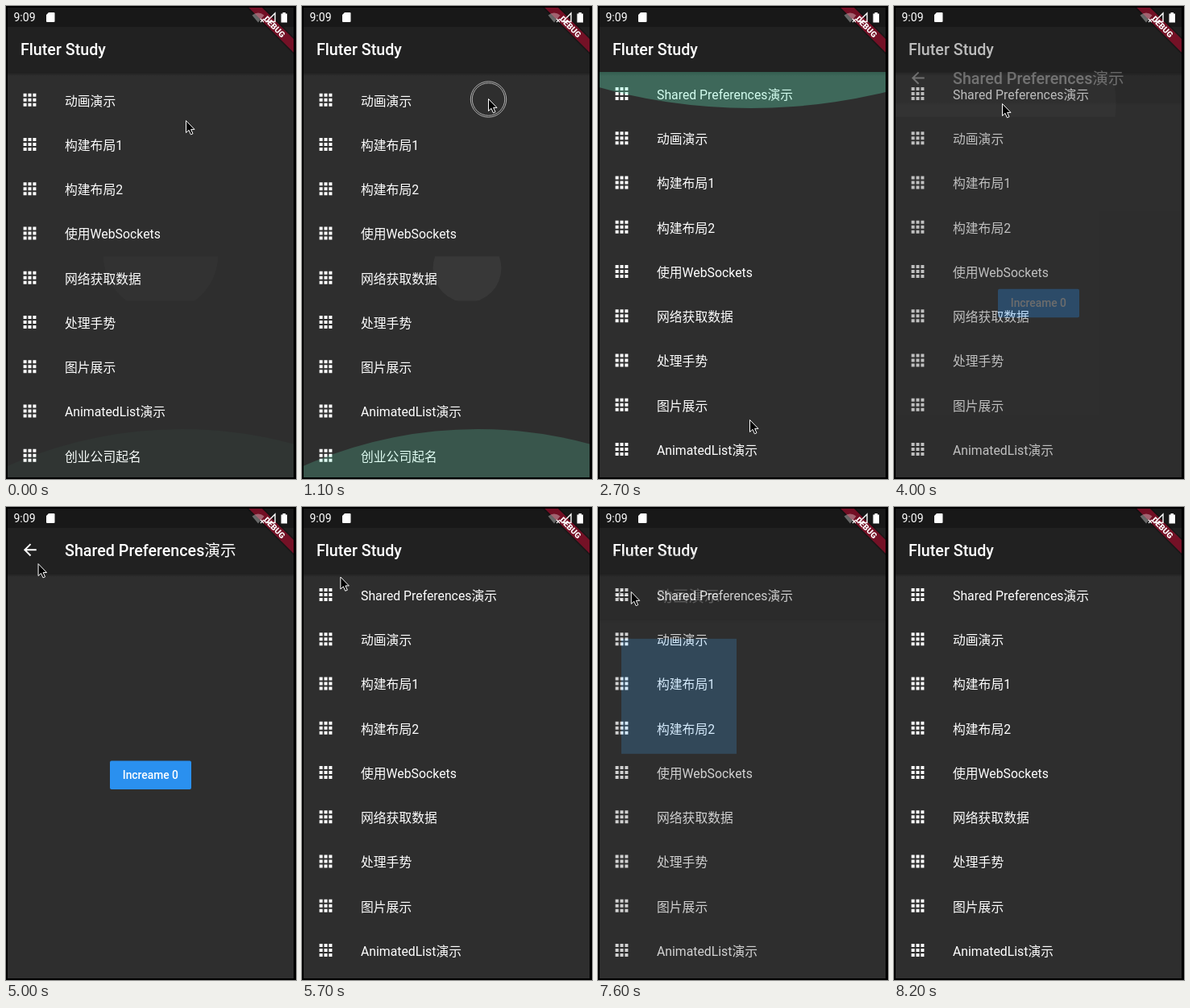
An HTML page that plays this animation: 360 by 588 pixels, repeating every 8300 ms.

```html
<!DOCTYPE html>
<html lang="zh-CN">
<head>
<meta charset="utf-8">
<title>Fluter Study</title>
<style>
  html, body { margin: 0; width: 100%; height: 100%; overflow: hidden; background: #000; }
  body > svg { display: block; width: 360px; height: 588px; }
  text { fill: #fff; font-family: Roboto, "Noto Sans CJK SC", "Noto Sans CJK", sans-serif; white-space: pre; }
  .item { font-size: 15.8px; }
  .title { font-size: 19.7px; font-weight: 500; }
  .title tspan { font-weight: 400; }
  .button { font-size: 13.8px; font-weight: 500; text-anchor: middle; }
  .debug { font-size: 10.2px; font-weight: 900; text-anchor: middle; }
</style>
</head>
<body>
<svg viewBox="0 0 360 588">
  <defs>
    <clipPath id="screen"><rect x="2" y="2" width="355" height="584"/></clipPath>
    <clipPath id="viewport"><rect x="2" y="82" width="355" height="504"/></clipPath>
    <linearGradient id="fade" x2="0" y2="1">
      <stop stop-opacity=".35"/><stop offset="1" stop-opacity="0"/>
    </linearGradient>
    <g id="chrome">
      <rect x="2" y="2" width="355" height="584" fill="#2e2e2e"/>
      <rect x="2" y="82" width="355" height="5" fill="url(#fade)"/>
      <rect x="2" y="2" width="355" height="80" fill="#212121"/>
    </g>
    <path id="apps" fill="#fff"/>
    <path id="back" fill="#fff" transform="translate(18 41.5) scale(.986)"
      d="M20 11H7.83l5.59-5.59L12 4l-8 8 8 8 1.41-1.41L7.83 13H20z"/>
  </defs>

  <g clip-path="url(#screen)">
    <use href="#chrome"/>
    <text class="title" x="18" y="61">Fluter Study</text>
    <g clip-path="url(#viewport)">
      <g id="list"></g>
      <circle id="glowBottom" r="534" fill="#64f4c4"/>
      <circle id="glowTop" r="534" fill="#64f4c4"/>
    </g>

    <g id="prefsPage">
      <use href="#chrome"/><use href="#back"/>
      <text class="title" x="73" y="61">Shared Preferences<tspan>演示</tspan></text>
      <rect x="129" y="315.500" width="101" height="35.500" rx="2" fill="#2a90ef"/>
      <text class="button" x="179.300" y="338">Increame 0</text>
    </g>

    <g id="motionPage">
      <use href="#chrome"/><use href="#back"/>
      <text class="title" x="73" y="61"><tspan>动画演示</tspan></text>
      <rect x="29" y="107" width="143" height="143" fill="#42a5f5"/>
    </g>

    <rect x="2" y="2" width="355" height="24" opacity=".27"/>
    <g transform="translate(357 2) rotate(45)">
      <rect x="-60" y="26" width="120" height="15" opacity=".3"/>
      <rect x="-60" y="27.600" width="120" height="11.800" fill="#a50e2e" opacity=".66"/>
      <text class="debug" y="37.200">DEBUG</text>
    </g>
    <text x="9.500" y="19.300" font-size="14">9:09</text>
    <g fill="#fff">
      <path d="M53 8h6.500q1 0 1 1v10q0 1-1 1h-8.500q-1 0-1-1v-8z"/>
      <path d="M305.500 11.500q7.500-6 15 0l-7.500 9z" opacity=".35"/>
      <path d="M316 16l4 4m0-4l-4 4" stroke="#fff" stroke-width="1.200"/>
      <path d="M334 9v10.500h-10.500z" fill="none" stroke="#fff" stroke-width="1.400"/>
      <path d="M343.500 8h3.500v1.500h2v11h-7.500v-11h2z"/>
    </g>
  </g>

  <g id="cursor">
    <g id="ring" fill="none" stroke="#ccc" stroke-width=".8">
      <circle cx=".5" cy="1" r="22.200"/><circle cx=".5" cy="1" r="20.200"/>
    </g>
    <path d="M.5.5V15.500L4 12.300 6.400 17.800 9 16.700 6.600 11.400H11z" fill="#000" stroke="#fff"/>
  </g>
</svg>

<script>
const LOOP = 8300, STEP = 100, DWELL = 200, TRANSITION = 300;
const ROW = 55.25, LIST_TOP = 82.5, MAX_SCROLL = 47.5, SLIDE = 147;
const $ = id => document.getElementById(id);
const set = (el, attrs) => {
  for (const name in attrs) el.setAttribute(name, attrs[name]);
};
const add = (parent, tag, attrs) => {
  const el = parent.appendChild(document.createElementNS('http://www.w3.org/2000/svg', tag));
  set(el, attrs);
  return el;
};

const progress = (t, from, span) => Math.min(1, Math.max(0, (t - from) / span));
const smooth = k => k * k * (3 - 2 * k);
const bezier = (x1, y1, x2, y2) => x => {
  const at = (a, b, s) => 3 * a * s * (1 - s) ** 2 + 3 * b * s * s * (1 - s) + s ** 3;
  let low = 0, high = 1;
  for (let i = 0; i < 24; i++) {
    const mid = (low + high) / 2;
    if (at(x1, x2, mid) < x) low = mid; else high = mid;
  }
  return at(y1, y2, low);
};
const easeIn = bezier(.42, 0, 1, 1);
const fastOutSlowIn = bezier(.4, 0, .2, 1);

let dots = '';
for (let i = 0; i < 9; i++) dots += `M${21.6 + i % 3 * 5.9} ${18.6 + Math.floor(i / 3) * 5.9}h4v4h-4z`;
set($('apps'), { d: dots });

// Each row is a nested svg, so a ripple is clipped to its tile.
const labels = ['Shared Preferences演示', '动画演示', '构建布局1', '构建布局2', '使用WebSockets',
  '网络获取数据', '处理手势', '图片展示', 'AnimatedList演示', '创业公司起名'];
const rows = labels.map((label, i) => {
  const row = add($('list'), 'svg', { y: LIST_TOP + i * ROW, width: 360, height: ROW });
  add(row, 'use', { href: '#apps' });
  add(row, 'text', { class: 'item', x: 73, y: 33.3 }).textContent = label;
  return row;
});

// The pointer rests at each stop for DWELL, then glides to the next.
const back = { x: 32, y: 66 };
const stops = [
  { at: 0, x: 223, y: 142 },
  { at: 700, x: 205, y: 326 },
  { at: 1100, x: 231, y: 115 },
  { at: 1900, x: 190, y: 260 },
  { at: 2600, x: 188, y: 514 },
  { at: 3800, x: 134, y: 121 },
  { at: 5200, ...back },
  { at: 6400, x: 103, y: 161 },
  { at: 7300, ...back },
  { at: 8100, x: 150, y: 592 }
];
function pointer(t) {
  let { x, y } = stops[0];
  stops.slice(1).forEach((stop, i) => {
    const leave = stops[i].at + DWELL;
    const k = smooth(progress(t, leave, stop.at - leave));
    x += (stop.x - x) * k;
    y += (stop.y - y) * k;
  });
  return { x, y };
}

const dragUp = 850, dragDown = 2100;
const scroll = t => MAX_SCROLL * (1 - smooth(progress(t, dragDown, 300)));

const pages = [
  { el: $('prefsPage'), row: 0, open: 3855, close: 5320 },
  { el: $('motionPage'), row: 1, open: 6365, close: 7420 }
];

// The first ripple and the first bottom glow are left over from before the loop.
const ripples = [
  { row: 5, at: -420, speed: .17, x: 192, y: 309 },
  { row: 5, at: dragUp, speed: .17, ...pointer(dragUp) },
  ...pages.map(({ row, open }) => ({ row, at: open - 150, speed: .48, ...pointer(open) }))
];
for (const ripple of ripples) {
  const cy = ripple.y - LIST_TOP - ripple.row * ROW + scroll(ripple.at);
  ripple.el = add(rows[ripple.row], 'circle', { cx: ripple.x, cy, fill: '#fff' });
}

const glows = [
  { el: $('glowBottom'), starts: [-910, dragUp + 50], x: 218, edge: 586, side: -1, depth: 60, strength: .2 },
  { el: $('glowTop'), starts: [dragDown + 300], x: 190, edge: 82, side: 1, depth: 45, strength: .29 }
];

function drawGlow({ el, starts, x, edge, side, depth, strength }, t) {
  const start = starts.findLast(s => s <= t) ?? t;
  const rise = progress(t, start, 200);
  const scale = depth * rise / 60;
  set(el, {
    transform: `translate(${x} ${edge + side * (depth * rise - 534 * scale)}) scale(1 ${scale})`,
    opacity: strength * rise * (1 - progress(t, start + 400, 600))
  });
}

function drawRipple({ el, at, speed }, t) {
  const age = Math.max(0, t - at);
  set(el, { r: age * speed, opacity: .09 * (1 - progress(age, 0, 530)) });
}

function drawPage({ el, open, close }, t) {
  const shown = progress(t, open, TRANSITION) - progress(t, close, TRANSITION);
  set(el, {
    opacity: shown > 0 ? easeIn(shown) : 0,
    transform: `translate(0 ${SLIDE * (1 - fastOutSlowIn(shown))})`
  });
}

const within = (t, from, span) => t >= from && t < from + span;
const isPressed = t => [dragUp, dragDown].some(at => within(t, at, 400)) ||
  pages.some(({ open, close }) => within(t, open - 100, 100) || within(t, close - 100, 100));

function draw(t) {
  const { x, y } = pointer(t);
  set($('cursor'), { transform: `translate(${x} ${y})` });
  set($('ring'), { opacity: isPressed(t) ? 1 : 0 });
  set($('list'), { transform: `translate(0 ${-scroll(t)})` });
  glows.forEach(glow => drawGlow(glow, t));
  ripples.forEach(ripple => drawRipple(ripple, t));
  pages.forEach(page => drawPage(page, t));
}

const start = performance.now();
function tick() {
  const t = (performance.now() - start) % LOOP;
  draw(Math.floor(t / STEP) * STEP);
  requestAnimationFrame(tick);
}
tick();
</script>
</body>
</html>
```
